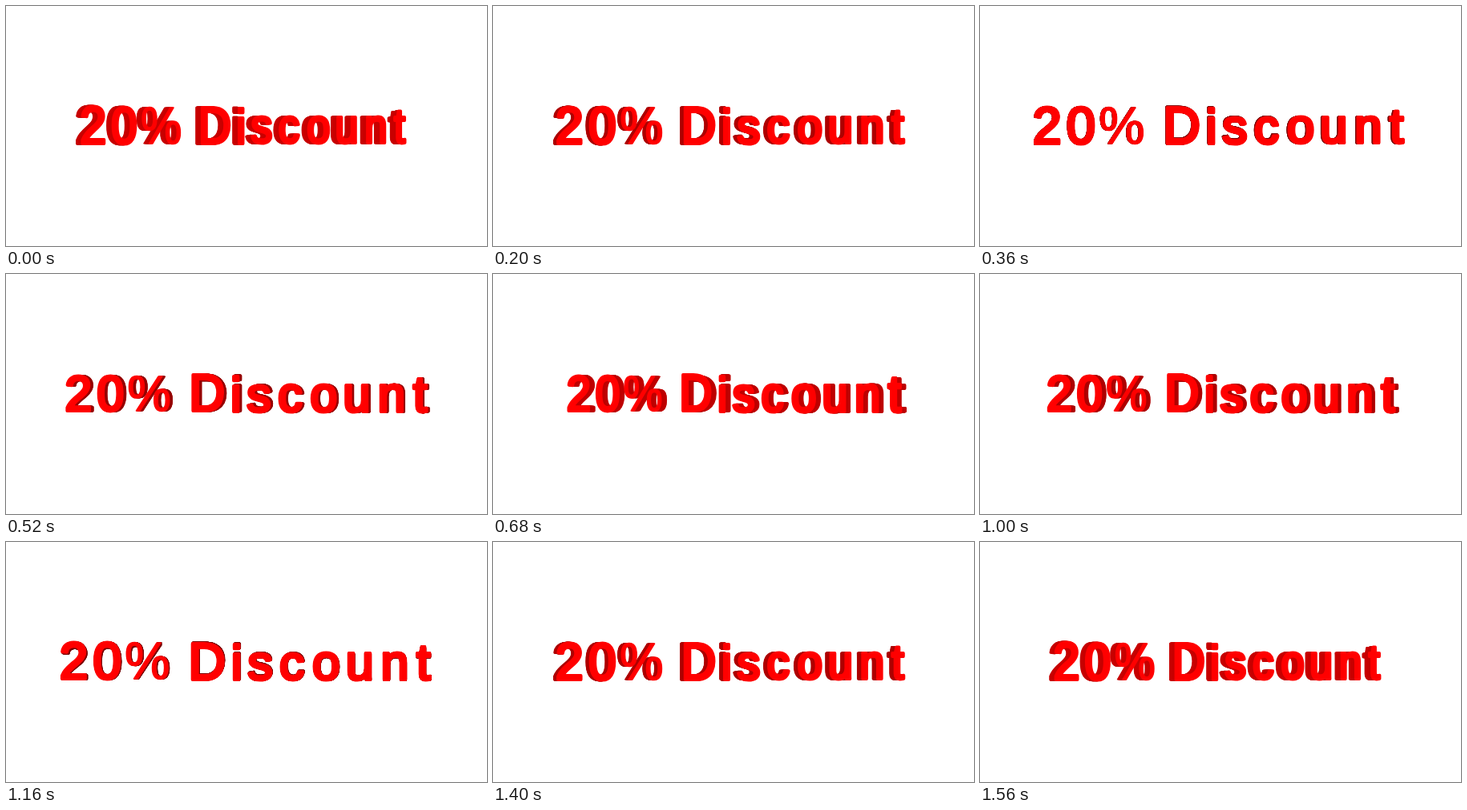
Recreate the animation shown at these times as an HTML page with a canvas. Size 600 px wide and 300 px high, loop 1600 ms.

```html
<!DOCTYPE html>
<html lang="en">
<head>
<meta charset="utf-8">
<title>20% Discount</title>
<style>
  html, body { margin: 0; width: 100%; height: 100%; overflow: hidden; background: #fff; }
  canvas { display: block; }
</style>
</head>
<body>
<canvas id="stage" width="600" height="300" role="img" aria-label="20% Discount"></canvas>
<script>
const ctx = document.getElementById('stage').getContext('2d');
const LOOP = 1600, STEP = 40;
const SWING = 29 * Math.PI / 180;
const DEPTH = 15, LAYERS = 15, CAMERA = 3650;
const CX = 300, CY = 149.5, BASE = 22;
const EM = 512; // large em, scaled down, keeps the outlines free of hinting

ctx.font = `${EM}px "Liberation Sans", Arial, sans-serif`;
ctx.lineJoin = ctx.lineCap = 'round';

// Ink centre of every letter on the unturned face
const centres = [84, 126, 176.5, 252.5, 288, 317, 357.5, 399.5, 441.5, 485, 520.5];
const glyphs = [...'20%Discount'].map((ch, i) => {
  const m = ctx.measureText(ch);
  return {
    ch,
    x: centres[i] - CX,
    ink: (m.actualBoundingBoxRight - m.actualBoundingBoxLeft) / 2,
    scale: (/[a-z]/.test(ch) ? 62 : 64) / EM,
    weight: ch === '%' ? 1.5 : 4.1
  };
});

// Draw the whole text at depth z, turned by angle a around the vertical axis
function drawLayer(z, a, color, inset) {
  const sin = Math.sin(a), cos = Math.cos(a);
  ctx.fillStyle = ctx.strokeStyle = color;
  for (const g of glyphs) {
    const x = g.x * cos + z * sin;
    const k = CAMERA / (CAMERA + g.x * sin - z * cos);
    const sx = k * cos - k * k * x * sin / CAMERA;
    ctx.setTransform(sx * g.scale, 0, 0, k * g.scale, CX + x * k, CY + BASE * k);
    ctx.lineWidth = (g.weight - inset) / g.scale;
    ctx.fillText(g.ch, -g.ink, 0);
    ctx.strokeText(g.ch, -g.ink, 0);
  }
}

function draw(time) {
  const t = Math.floor(time % LOOP / STEP) * STEP;
  const a = SWING * Math.cos(2 * Math.PI * t / LOOP);
  const shade = Math.round(255 * (0.42 + 0.75 * Math.abs(Math.sin(a))));

  ctx.setTransform(1, 0, 0, 1, 0, 0);
  ctx.fillStyle = '#fff';
  ctx.fillRect(0, 0, 600, 300);
  // The sides sit slightly inside the face so that no dark rim shows around it
  for (let i = 0; i < LAYERS; i++) {
    drawLayer(DEPTH * (i / LAYERS - 0.5), a, `rgb(${shade},0,0)`, 0.9);
  }
  drawLayer(DEPTH / 2, a, '#f00', 0);
}

function tick() {
  draw(performance.now());
  requestAnimationFrame(tick);
}
tick();
</script>
</body>
</html>
```
